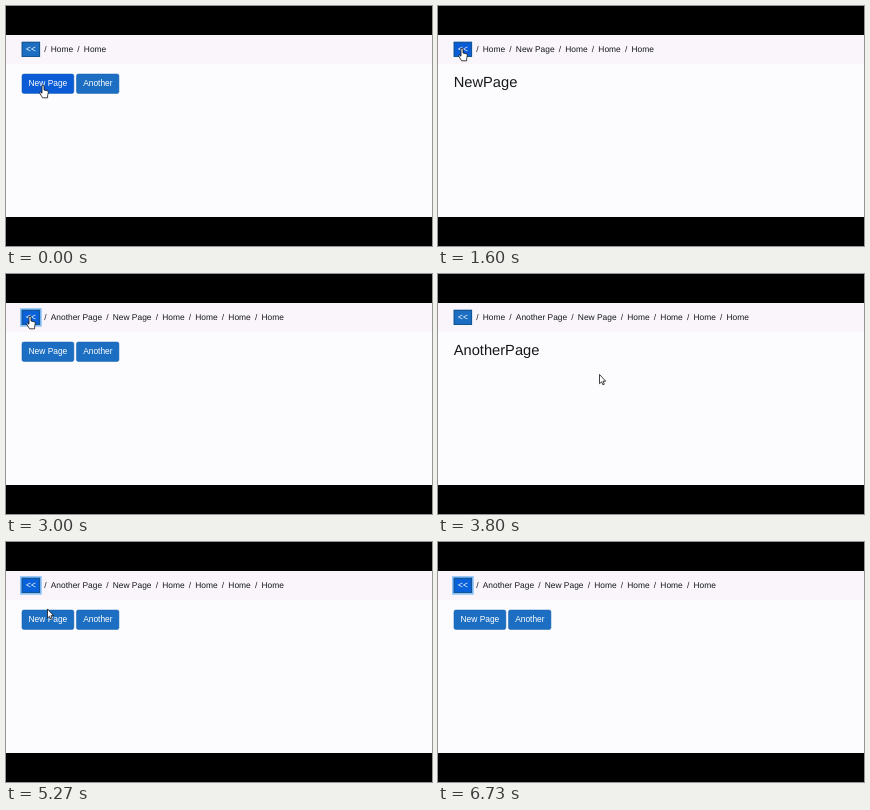
An HTML page that plays this animation: 426 by 240 pixels, repeating every 6.79 s.

```html
<!DOCTYPE html>
<html lang="en">
<head>
<meta charset="utf-8">
<title>Breadcrumb navigation</title>
<style>
html, body { margin: 0; width: 100%; height: 100%; overflow: hidden; background: #000; }
#view { position: absolute; left: 0; top: 29px; width: 426px; height: 182px; overflow: hidden; background: #fcfcfe; }
#page {
  position: absolute; left: 0; top: 0; width: 813px; height: 348px;
  transform: scale(.524); transform-origin: 0 0;
  font: 16px/24px "Liberation Sans", Arial, sans-serif; color: #16181b;
  text-rendering: geometricPrecision;
}
header { display: flex; align-items: center; height: 55px; padding-left: 30px; background: #f9f5fb; }
button { font: inherit; color: #fff; background: #1b6ec2; border: 1px solid #1861ac; }
button.hover { background: #0a5bd6; }
#back { box-sizing: border-box; width: 35px; height: 29px; padding: 0; border: 2px solid #14568f; line-height: 23px; }
#back.focus { background: #0a62da; box-shadow: 0 0 0 3.2px #8cc2f6; }
#crumbs { white-space: nowrap; }
#crumbs span::before { content: "/"; padding: 0 8px; }
main { position: absolute; left: 30px; top: 74px; white-space: nowrap; }
main button { padding: 6px 12px; border-radius: 4px; }
h3 { margin: 0; font-size: 28px; line-height: 33.6px; font-weight: 400; }
svg { position: absolute; left: 0; top: 0; }
path { fill: #fff; stroke: #111; stroke-width: .8; stroke-linejoin: round; }
</style>
</head>
<body>
<div id="view">
  <div id="page">
    <header><button id="back">&lt;&lt;</button><div id="crumbs"></div></header>
    <main>
      <div id="home"><button id="first">New Page</button> <button id="second">Another</button></div>
      <h3 id="title"></h3>
    </main>
  </div>
  <svg width="426" height="182"><path id="cursor"/></svg>
</div>
<script>
const $ = id => document.getElementById(id);
const LOOP = 6790, STEP = 1000 / 15;

const ARROW = "M0 0V9.2L2 7.3 3.4 10.3 4.8 9.7 3.5 6.7H6.2Z";
const HAND = "M-1 .7Q0-.5 1 .7V5L4.4 5.8Q5.4 6.1 5.3 7.3L4.6 10.8V12.8H-.4L-2.9 8.8Q-3.8 7.2-2.6 7L-1 8.2Z";

// start time, page title (empty = home), breadcrumb initials; home is reached by the back button
const names = { H: "Home", N: "New Page", A: "Another Page" };
const scenes = [
  [0, "", "HH"],
  [170, "NewPage", "HHH"],
  [520, "", "NHHH"],
  [900, "NewPage", "HNHHH"],
  [1800, "", "NHHH"],
  [2550, "AnotherPage", "HNHHH"],
  [3000, "", "ANHHHH"],
  [3450, "AnotherPage", "HANHHHH"],
  [4450, "", "ANHHHH"]
];

// time, x, y of the pointer tip
const track = [
  [0, 37, 79], [200, 37, 79], [450, 24, 42], [570, 24, 42],
  [820, 37, 79], [1150, 37, 79], [1600, 24, 42], [1950, 24, 42],
  [2200, 27, 67], [2450, 90, 77], [2600, 90, 77], [2900, 24, 42],
  [3080, 24, 42], [3350, 90, 77], [3500, 90, 77], [3800, 161.5, 100.5],
  [4300, 24, 42], [4800, 24, 42], [5600, 52, 82], [6150, 52, 82],
  [6600, 62, 216], [LOOP, 62, 216]
];

// left, top, right, bottom on the stage
const areas = {
  back: [16, 36, 34, 51],
  first: [16, 68, 68, 88],
  second: [70, 68, 113, 88]
};

function pointer(t) {
  const i = Math.max(1, track.findIndex(k => k[0] > t));
  const [t0, x0, y0] = track[i - 1], [t1, x1, y1] = track[i];
  const u = (t - t0) / (t1 - t0), e = u * u * (3 - 2 * u);
  return [x0 + (x1 - x0) * e, y0 + (y1 - y0) * e];
}

let shown;
function show(scene) {
  if (scene === shown) return;
  shown = scene;
  const [time, title, crumbs] = scene;
  $("home").hidden = title !== "";
  $("title").textContent = title;
  $("crumbs").innerHTML = [...crumbs].map(c => `<span>${names[c]}</span>`).join("");
  $("back").classList.toggle("focus", time > 0 && !title);
}

function draw(now) {
  const t = Math.floor((now % LOOP + 5) / STEP) * STEP;
  show(scenes.findLast(s => s[0] <= t));
  const [x, y] = pointer(Math.min(t, LOOP - 1));
  let over = false;
  for (const [id, [l, top, r, b]] of Object.entries(areas)) {
    const hit = x >= l && x <= r && y >= top && y <= b;
    $(id).classList.toggle("hover", hit);
    over ||= hit;
  }
  $("cursor").setAttribute("d", over ? HAND : ARROW);
  $("cursor").setAttribute("transform", `translate(${x} ${y - 29})`);
}

const start = performance.now();
function tick() {
  draw(performance.now() - start);
  requestAnimationFrame(tick);
}
tick();
</script>
</body>
</html>
```
